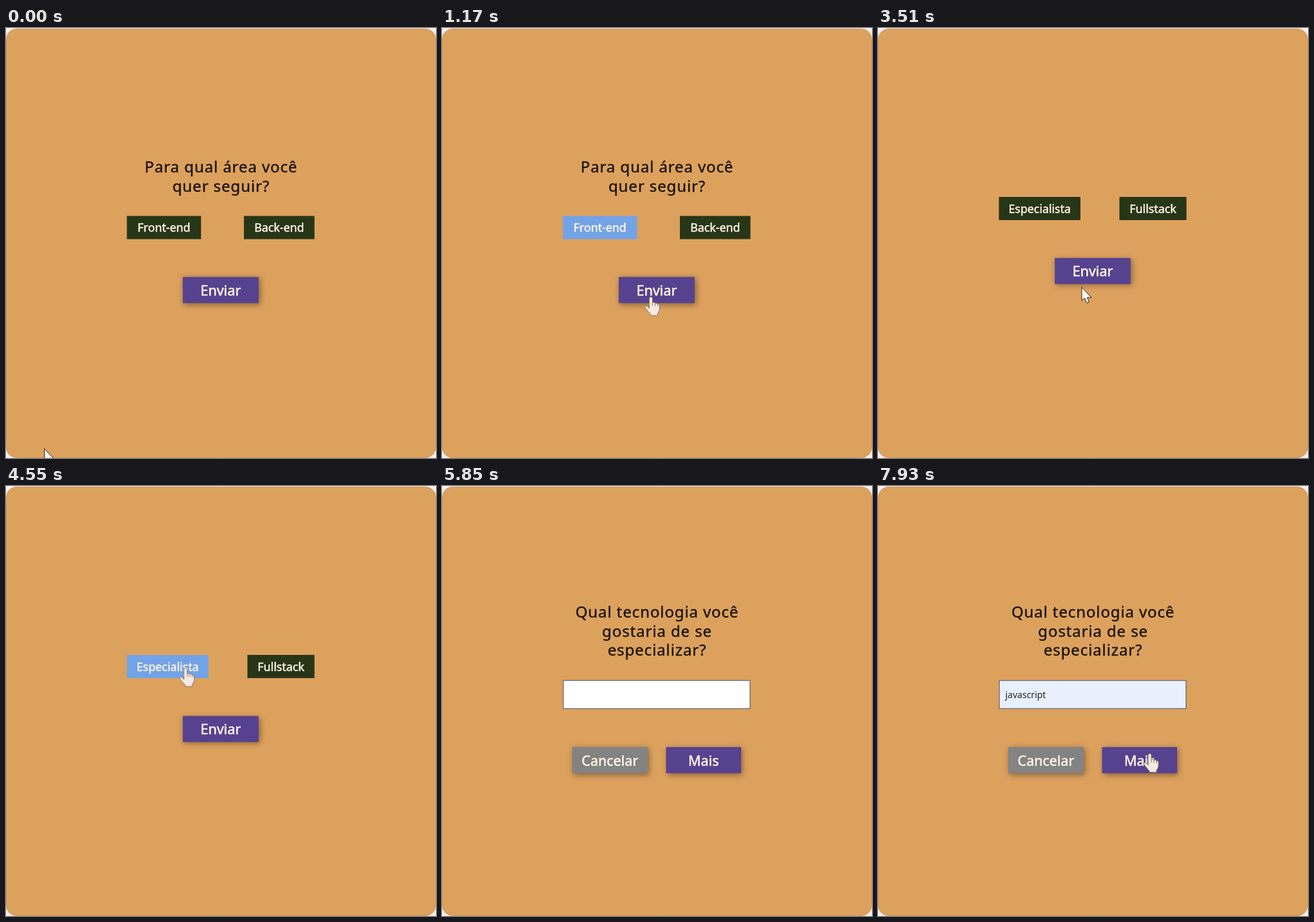
Recreate the animation shown at these times as an HTML page with a canvas. Size 667 by 667 pixels, loop 8 s.

```html
<!DOCTYPE html>
<html lang="pt">
<head>
<meta charset="utf-8">
<title>Formulário</title>
<style>
html, body { margin: 0; height: 100%; overflow: hidden; background: #f3efec; }
canvas { display: block; width: 100vw; height: 100vh; }
</style>
</head>
<body>
<canvas id="stage"></canvas>
<script>
const SIZE = 667, LOOP = 8000, MID = 333.2;
const FONT = '"Noto Sans", "Open Sans", sans-serif';
const DARK = '#283618', BLUE = '#73a3e7', PURPLE = '#56428f', GREY = '#838383', CREAM = '#fcf3e2';
const canvas = document.getElementById('stage');
const ctx = canvas.getContext('2d');
let scale = 1;

function resize() {
  scale = innerWidth * devicePixelRatio / SIZE;
  canvas.width = Math.round(innerWidth * devicePixelRatio);
  canvas.height = Math.round(innerHeight * devicePixelRatio);
}

const arrowShape = new Path2D('M0 0V21L4.5 17L8 24.5L11.5 23L8.5 16H15Z');
const handShape = new Path2D('M0 2Q2.5 -2 5 2V9Q7.5 7.5 9 10Q12 9 13 11.5Q16 10.5 16 14V19' +
  'Q15.5 23 13 26V29H2V27Q-2 23 -5.5 18Q-8.5 13.5 -4.5 14Q-2 15 0 18Z');
const knuckles = new Path2D('M5 9V14M9 10.5V14.5M12.8 12V15');

const choice = (top, question, left, right) => ({ top, question, left, right });
const screens = {
  area: choice(291.5, ['Para qual área você', 'quer seguir?'], ['Front-end', 187.5, 115], ['Back-end', 369, 109.5]),
  tech: choice(291.5, ['Qual tecnologia você', 'deseja aprender?'], ['React', 187.5, 76], ['Vue', 414.5, 64]),
  path: choice(262, [], ['Especialista', 187.5, 126.5], ['Fullstack', 374.5, 104])
};
const lastQuestion = ['Qual tecnologia você', 'gostaria de se', 'especializar?'];

// Each step: start time, screen, pointer [kind, x, y], extra state
const arrow = (x, y) => [arrowShape, x, y];
const hand = (x, y) => [handShape, x, y];
const on = { selected: true };
const typed = (text, more) => ({ text, focus: true, caret: true, ...more });
const filled = { text: 'javascript', fill: true };
const steps = [
  [0, 'area', arrow(59.5, 652.5)],
  [130, 'area', arrow(163, 452)],
  [390, 'area', hand(248, 309)],
  [650, 'area', hand(250, 311), on],
  [780, 'area', hand(262, 318), on],
  [910, 'area', arrow(286, 348), on],
  [1040, 'area', hand(312, 394), on],
  [1170, 'area', hand(321.5, 417), on],
  [1560, 'tech', hand(321.5, 417)],
  [2080, 'tech', arrow(282.5, 345.5)],
  [2730, 'tech', hand(235, 309), on],
  [3120, 'tech', hand(316, 402), on],
  [3510, 'path', arrow(316, 402)],
  [4160, 'path', arrow(298, 330)],
  [4550, 'path', hand(276, 282), on],
  [5200, 'path', arrow(296, 318), on],
  [5330, 'path', hand(320, 378), on],
  [5460, 'input', arrow(320, 378)],
  [5850, 'input', null],
  [5980, 'input', null, typed('')],
  [6240, 'input', null, typed('j')],
  [6370, 'input', null, typed('ja')],
  [6500, 'input', null, typed('java')],
  [6890, 'input', null, typed('javascript', { fill: true })],
  [7020, 'input', null, { ...filled, focus: true }],
  [7280, 'input', arrow(345, 362), { ...filled, focus: true }],
  [7410, 'input', arrow(378, 388), { ...filled, focus: true }],
  [7540, 'input', hand(412, 411), { ...filled, focus: true }],
  [7930, 'input', hand(419, 415), filled]
];

// A thin outline in the text colour gives a weight between regular and bold
function label(text, x, y, size, color, { align = 'center', outline = 0.5, spacing = 0 } = {}) {
  ctx.font = `${size}px ${FONT}`;
  ctx.textAlign = align;
  ctx.letterSpacing = spacing + 'px';
  ctx.fillStyle = ctx.strokeStyle = color;
  ctx.fillText(text, x + spacing / 2, y);
  if (!outline) return;
  ctx.lineWidth = outline;
  ctx.lineJoin = 'round';
  ctx.strokeText(text, x + spacing / 2, y);
}

function box(x, y, w, h, color) {
  ctx.fillStyle = color;
  ctx.fillRect(x, y, w, h);
}

function heading(lines, y) {
  lines.forEach((line, i) =>
    label(line, MID, y + i * 29.5, 24, '#15120b', { outline: 0.35, spacing: 0.88 }));
}

function option([text, x, w], y, color) {
  box(x, y, w, 36, color);
  label(text, x + w / 2, y + 24.5, 17.8, CREAM);
}

function button(text, x, y, w, color) {
  ctx.save();
  ctx.shadowColor = 'rgba(0,0,0,.42)';
  ctx.shadowBlur = 9 * scale;
  ctx.shadowOffsetX = ctx.shadowOffsetY = 2 * scale;
  box(x, y, w, 40.5, color);
  ctx.restore();
  label(text, x + w / 2, y + 28.5, 21.5, CREAM, { outline: 0.6 });
}

function drawChoice({ top, question, left, right }, { selected }) {
  heading(question, 224);
  option(left, top, selected ? BLUE : DARK);
  option(right, top, DARK);
  button('Enviar', 274.2, top + 94.7, 117.6, PURPLE);
}

function drawInput({ text = '', focus, caret, fill }) {
  heading(lastQuestion, 204);
  if (focus) {
    box(186, 299.5, 294, 48, '#fff');
    box(187, 300.5, 292, 46, '#101010');
    box(189.5, 303, 287, 41, fill ? '#e8f0fe' : '#fff');
  } else {
    box(187.5, 301, 291, 45, '#6a6a6a');
    box(188.8, 302.3, 288.4, 42.4, fill ? '#e8f0fe' : '#fff');
  }
  label(text, 197.5, 328.5, 14, '#222', { align: 'left', outline: 0 });
  if (caret) box(198 + ctx.measureText(text).width, 316, 1.2, 16, '#000');
  button('Cancelar', 202, 405, 117, GREY);
  button('Mais', 347.5, 405, 116.5, PURPLE);
}

function drawPointer([shape, x, y]) {
  const isHand = shape === handShape;
  ctx.save();
  ctx.translate(x, y);
  ctx.lineJoin = 'round';
  ctx.fillStyle = isHand ? '#f5eae2' : '#fbf4ee';
  ctx.strokeStyle = isHand ? '#857263' : '#2a231c';
  ctx.lineWidth = 1;
  ctx.fill(shape);
  ctx.stroke(shape);
  if (isHand) ctx.stroke(knuckles);
  ctx.restore();
}

function draw(t) {
  const [, name, pointer, state = {}] = steps.findLast(s => s[0] <= t);
  ctx.setTransform(scale, 0, 0, scale, 0, 0);
  box(0, 0, SIZE, SIZE, '#f3efec');
  ctx.beginPath();
  ctx.roundRect(0.5, 1.5, 666, 665, 16);
  ctx.fillStyle = '#dda15e';
  ctx.fill();
  ctx.strokeStyle = '#c9975d';
  ctx.lineWidth = 1;
  ctx.stroke();
  if (name === 'input') drawInput(state);
  else drawChoice(screens[name], state);
  if (pointer) drawPointer(pointer);
}

function frame() {
  draw(performance.now() % LOOP);
  requestAnimationFrame(frame);
}

addEventListener('resize', resize);
resize();
frame();
</script>
</body>
</html>
```
